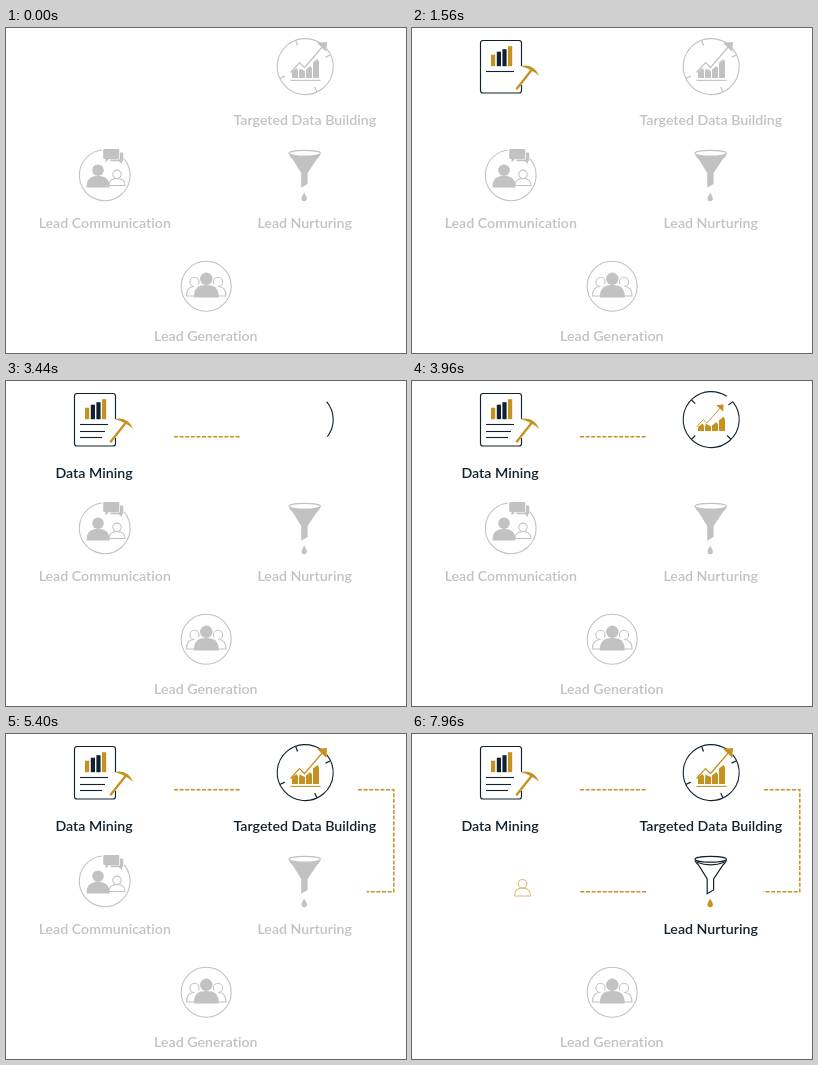
An HTML page with a canvas for the animation above (8000 ms loop, 400 by 325 pixels).

```html
<!DOCTYPE html>
<html lang="en">
<head>
<meta charset="utf-8">
<title>Lead process</title>
<style>
html, body { margin: 0; width: 100%; height: 100%; overflow: hidden; background: #fff; }
canvas { display: block; width: 400px; height: 325px; }
</style>
</head>
<body>
<canvas id="stage"></canvas>
<script>
const LOOP = 8000;
const DARK = '#11222f', GOLD = '#c6921f', GRAY = '#c2c2c2';
const canvas = document.getElementById('stage');
const ctx = canvas.getContext('2d');
const ratio = window.devicePixelRatio || 1;
canvas.width = 400 * ratio;
canvas.height = 325 * ratio;

const clamp = v => Math.max(0, Math.min(1, v));
const span = (t, from, to) => clamp((t - from) / (to - from));
const easeOut = p => 1 - (1 - p) ** 3;
const easeInOut = p => p * p * (3 - 2 * p);

function stroke(path, color, width = 1.1) {
  ctx.strokeStyle = color;
  ctx.lineWidth = width;
  ctx.stroke(path);
}

function fill(path, color) {
  ctx.fillStyle = color;
  ctx.fill(path);
}

// Strokes the first part of a path of known length.
function draw(path, length, p, color, width) {
  if (p <= 0) return;
  ctx.save();
  if (p < 1) ctx.setLineDash([length * p, length * 2]);
  stroke(path, color, width);
  ctx.restore();
}

function line(x1, y1, x2, y2, color, width = 1.1, p = 1) {
  if (p <= 0) return;
  const path = new Path2D();
  path.moveTo(x1, y1);
  path.lineTo(x1 + (x2 - x1) * p, y1 + (y2 - y1) * p);
  stroke(path, color, width);
}

function circle(x, y, r, from = 0, to = Math.PI * 2) {
  const path = new Path2D();
  path.arc(x, y, r, from, to);
  return path;
}

function label(text, x, y, color, alpha = 1) {
  if (alpha <= 0) return;
  ctx.save();
  ctx.globalAlpha = alpha;
  ctx.fillStyle = color;
  ctx.font = '600 14.2px Lato, sans-serif';
  ctx.letterSpacing = '0.01px'; // turns ligatures off
  ctx.textAlign = 'center';
  ctx.fillText(text, x, y);
  ctx.restore();
}

function dashes(points, p) {
  if (p <= 0) return;
  const parts = points.slice(1).map((b, i) => Math.hypot(b[0] - points[i][0], b[1] - points[i][1]));
  let left = parts.reduce((a, b) => a + b) * p;
  const path = new Path2D();
  path.moveTo(...points[0]);
  parts.forEach((size, i) => {
    if (left <= 0) return;
    const k = Math.min(1, left / size), [ax, ay] = points[i], [bx, by] = points[i + 1];
    path.lineTo(ax + (bx - ax) * k, ay + (by - ay) * k);
    left -= size;
  });
  ctx.save();
  ctx.setLineDash([4, 1.6]);
  stroke(path, GOLD, 1.5);
  ctx.restore();
}

const sheet = new Path2D('M109.5 38V15Q109.5 12.5 107 12.5H71Q68.5 12.5 68.5 15V62.5Q68.5 65 71 65H107Q109.5 65 109.5 62.5V57');
const pickHead = new Path2D('M108.5 38Q122 35 127.3 48Q119.5 41 108.5 38Z');

function dataMining(t) {
  draw(sheet, 170, easeInOut(span(t, 20, 720)), DARK, 1.15);

  [[79, 11.5, GOLD], [84.8, 14.5, DARK], [90.4, 17, DARK], [96, 20, GOLD]].forEach(([x, h, color], i) => {
    const size = h * easeOut(span(t, 880 + i * 90, 1160 + i * 90));
    ctx.fillStyle = color;
    ctx.fillRect(x, 38.2 - size, 4.2, size);
  });
  line(74, 43.5, 102, 43.5, DARK, 1.1, span(t, 1280, 1520));
  line(74, 50.5, 99, 50.5, DARK, 1.1, span(t, 1720, 1960));
  line(74, 56.5, 96, 56.5, DARK, 1.1, span(t, 1960, 2200));

  const shown = span(t, 600, 840);
  if (!shown) return;
  const swing = Math.sin(Math.PI * span(t, 980, 1480)) + Math.sin(Math.PI * span(t, 1720, 2220));
  ctx.save();
  ctx.globalAlpha = shown;
  ctx.translate(104.5, 61);
  ctx.rotate(-0.12 * swing);
  ctx.translate(-104.5, -61);
  line(104.3, 61.3, 120, 41.5, GOLD, 2.3);
  fill(pickHead, GOLD);
  ctx.restore();
}

const bars = [[286, 40.5], [293, 41], [300, 38.5], [307, 31.5]];
const trend = new Path2D('M284.5 44.5L293.5 34.5L298.5 39.5L317.5 17.5');
const arrowHead = new Path2D('M321 14L311 14.8L320.3 24Z');

// turn: ring rotation in degrees, grow: chart size
function targetIcon(ink, accent, ring, turn, grow, base) {
  const cx = 299.2, cy = 38.6, r = 28;
  const arc = circle(cx, cy, r, -0.7, -0.7 + 6);
  draw(arc, r * 6, ring, ink, 1.1);
  if (ring >= 0.5) {
    [-110, -25, 65, 155].forEach(deg => {
      const a = (deg + turn) * Math.PI / 180, c = Math.cos(a), s = Math.sin(a);
      line(cx + c * r, cy + s * r, cx + c * 22.5, cy + s * 22.5, ink, 1.2);
    });
  }
  if (grow <= 0) return;
  ctx.fillStyle = accent;
  bars.forEach(([x, top], i) => {
    const h = (50 - top) * grow, w = 6, peak = i === 1 ? 0.1 : 0.75;
    ctx.beginPath();
    ctx.moveTo(x, 50);
    ctx.lineTo(x, 50 - h + 3);
    ctx.lineTo(x + w * peak, 50 - h - 0.5);
    ctx.lineTo(x + w, 50 - h + 2);
    ctx.lineTo(x + w, 50);
    ctx.fill();
  });
  line(284.5, 52.4, 314.5, 52.4, accent, 1.1, base);
  ctx.save();
  ctx.translate(285, 50);
  ctx.scale(grow, grow);
  ctx.translate(-285, -50);
  stroke(trend, accent, 1.2);
  fill(arrowHead, accent);
  ctx.restore();
}

const cone = new Path2D('M283 126.5Q284 129 286.5 131L295.2 145V159.8L301.6 156V145L311 131Q313.5 129 314.5 126.5');
const lip = new Path2D('M285 128.3Q298.7 133.5 312.5 128.3');
const rim = new Path2D();
rim.ellipse(298.7, 125.3, 15.7, 2.9, 0, 0, Math.PI * 2);
const dropShape = new Path2D('M0 -4.8C.8 -2.5 2.7 -.5 2.7 1.5A2.7 2.7 0 0 1 -2.7 1.5C-2.7 -.5 -.8 -2.5 0 -4.8Z');

function drop(y, size, color) {
  if (size <= 0) return;
  ctx.save();
  ctx.translate(298.2, y);
  ctx.scale(size, size);
  fill(dropShape, color);
  ctx.restore();
}

function grayFunnel() {
  fill(cone, GRAY);
  fill(rim, '#fff');
  stroke(rim, GRAY, 1.2);
  drop(169, 1, GRAY);
}

function funnel(t) {
  draw(rim, 66, span(t, 5440, 5640), DARK, 1.2);
  draw(cone, 86, span(t, 5520, 5840), DARK, 1.2);
  draw(lip, 30, span(t, 5640, 5840), DARK, 1.1);
  drop(163.5 + 5.5 * span(t, 6560, 6960) ** 2, easeOut(span(t, 6220, 6520)), GOLD);
}

// Head and shoulders; y is the bottom of the body.
function person(x, y, head, half, height, color, solid) {
  const body = new Path2D();
  body.moveTo(x - half, y);
  body.bezierCurveTo(x - half, y - height * 0.8, x - half * 0.6, y - height, x, y - height);
  body.bezierCurveTo(x + half * 0.6, y - height, x + half, y - height * 0.8, x + half, y);
  body.closePath();
  const top = circle(x, y - height - head, head);
  for (const part of [body, top]) {
    fill(part, solid ? color : '#fff');
    if (!solid) stroke(part, color, 1.1);
  }
}

const bubble = new Path2D('M98.5 121H112Q113.3 121 113.3 122.3V130Q113.3 131 112 131H103L99.5 134.5V131H98.5Q97.2 131 97.2 130V122.3Q97.2 121 98.5 121Z');
const reply = new Path2D('M114 124.5H116Q117.3 124.5 117.3 125.8V132Q117.3 133.2 116 133.2V136L112.8 133.2H105.5Q104.2 133.2 104 131.6H113Q114 131.6 114 130.5Z');

function grayTalk() {
  stroke(circle(98.7, 147.3, 25.4, -0.7, 4.6), GRAY, 1.1);
  person(111, 157.5, 4.2, 8, 7, GRAY, false);
  person(92, 159.5, 5.8, 11.5, 11.5, GRAY, true);
  fill(bubble, GRAY);
  fill(reply, GRAY);
}

function grayGroup() {
  stroke(circle(200.2, 258.2, 25), GRAY, 1.1);
  for (const x of [188.5, 212]) person(x, 268, 4.6, 8, 9.5, GRAY, false);
  const halo = new Path2D();
  halo.ellipse(200.3, 263, 13.5, 7, 0, Math.PI, 0);
  stroke(halo, '#fff', 2);
  person(200.3, 269.5, 6.2, 12.5, 12.5, GRAY, true);
}

function render(t) {
  ctx.setTransform(ratio, 0, 0, ratio, 0, 0);
  ctx.fillStyle = '#fff';
  ctx.fillRect(0, 0, 400, 325);

  dataMining(t);
  label('Data Mining', 88, 97, DARK, span(t, 2400, 2880));
  dashes([[168, 55.8], [234, 55.8]], span(t, 2880, 3280));

  if (t < 3320) {
    targetIcon(GRAY, GRAY, 1, 0, 1, 1);
    label('Targeted Data Building', 298.8, 97, GRAY);
  } else {
    const turn = Math.max(0, (5250 - t) * 0.0543);
    targetIcon(DARK, GOLD, span(t, 3360, 3720), turn, easeOut(span(t, 3600, 4600)), span(t, 4280, 4600));
    label('Targeted Data Building', 298.8, 97, DARK, span(t, 4560, 5020));
  }
  dashes([[352, 55.8], [387.8, 55.8], [387.8, 157.8], [351.5, 157.8]], span(t, 5060, 5420));

  if (t < 5430) {
    grayFunnel();
    label('Lead Nurturing', 298.7, 200, GRAY);
  } else {
    funnel(t);
    label('Lead Nurturing', 298.7, 200, DARK, span(t, 7060, 7500));
  }
  dashes([[234, 157.8], [168, 157.8]], span(t, 7440, 7800));

  if (t < 7830) {
    grayTalk();
    label('Lead Communication', 98.8, 200, GRAY);
  } else {
    const p = span(t, 7880, 7980);
    ctx.globalAlpha = p * 0.75;
    person(110.6, 161.5 + 3 * (1 - p), 4.3, 8, 8, GOLD, false);
    ctx.globalAlpha = 1;
  }

  grayGroup();
  label('Lead Generation', 199.8, 313, GRAY);
}

const start = performance.now();
function tick() {
  render((performance.now() - start) % LOOP);
  requestAnimationFrame(tick);
}
tick();
</script>
</body>
</html>
```
